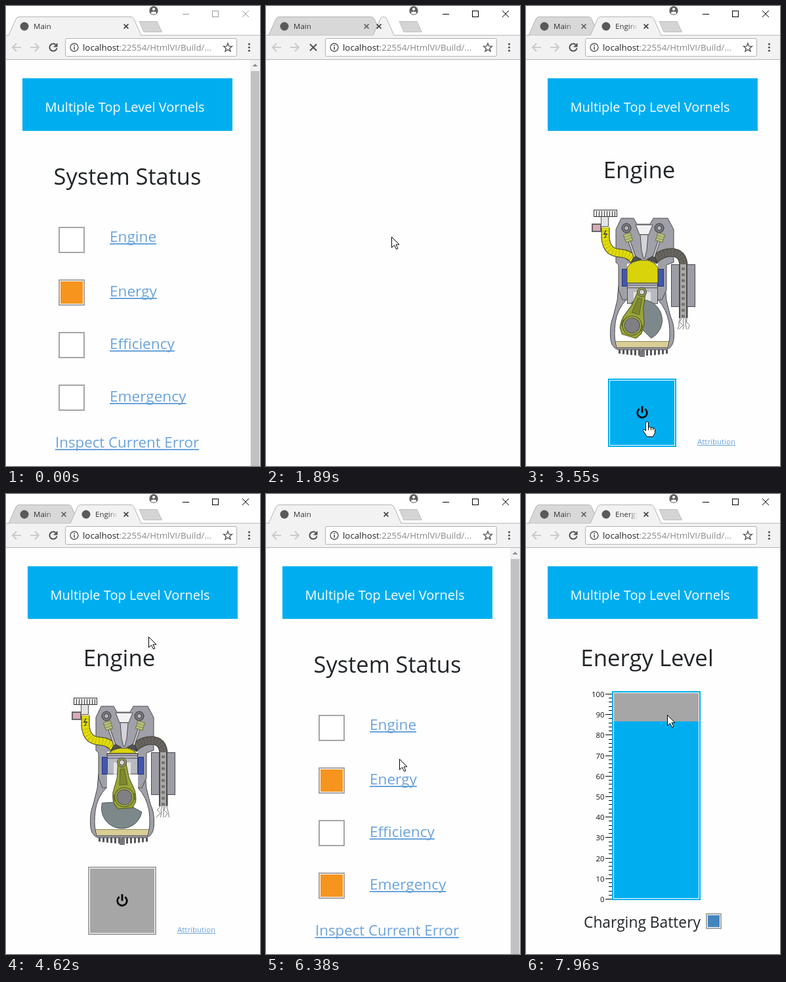
An HTML page with a canvas that plays this animation: 387 px wide and 700 px high, repeating every 8 s.

```html
<!DOCTYPE html>
<html lang="en">
<head>
<meta charset="utf-8">
<title>Main</title>
<style>
html, body { margin: 0; width: 100%; height: 100%; overflow: hidden; background: #fff; }
canvas { display: block; width: 387px; height: 700px; }
</style>
</head>
<body>
<canvas id="stage" width="387" height="700"></canvas>
<script>
const c = document.getElementById('stage').getContext('2d');
const LOOP = 8000, BLUE = '#00aef0', GREY = '#a6a6a6', INK = '#222629', LINK = '#6aa3da';
const FONT = '"Open Sans", "Noto Sans", sans-serif';

// Times of the main events, in ms
const FOCUS = 1740, OPEN_A = 1890, CLOSE_A = 5640, OPEN_B = 6760, LOAD = 190;
const POWER_OFF = 3610, DRAG = 7150;

const clamp = (v, a = 0, b = 1) => Math.min(b, Math.max(a, v));
const easeOut = p => 1 - (1 - clamp(p)) ** 2;

// Pointer path: time, x, y
const PATH = [
  [310, 275, 641], [620, 246, 545], [1050, 191, 351], [1890, 191, 351],
  [2300, 188, 355], [2530, 180, 369], [2690, 222, 352], [2810, 236, 300], [2940, 178, 253],
  [3070, 116, 325], [3200, 130, 450], [3450, 184, 632], [4010, 184, 632],
  [4340, 217, 217], [4620, 217, 217], [4760, 220, 195], [5250, 176, 25],
  [5400, 180, 29], [5600, 180, 29], [6380, 203, 403], [6530, 197, 430],
  [6990, 197, 430], [7150, 205, 610], [7550, 206, 449], [7960, 215, 336], [8000, 215, 336]
];

function slope(i, k) {
  const a = PATH[i - 1], b = PATH[i], d = PATH[i + 1];
  if (!a || !d) return 0;
  const same = (p, q) => p[1] === q[1] && p[2] === q[2];
  return same(a, b) || same(b, d) ? 0 : (d[k] - a[k]) / (d[0] - a[0]);
}

function pointer(t) {
  if (t < PATH[0][0]) return null;
  let i = 0;
  while (i < PATH.length - 2 && t >= PATH[i + 1][0]) i++;
  const a = PATH[i], b = PATH[i + 1], h = b[0] - a[0], u = clamp((t - a[0]) / h);
  const at = k => (2 * u ** 3 - 3 * u * u + 1) * a[k] + (u ** 3 - 2 * u * u + u) * h * slope(i, k)
    + (3 * u * u - 2 * u ** 3) * b[k] + (u ** 3 - u * u) * h * slope(i + 1, k);
  return { x: at(1), y: at(2) };
}

const inside = (p, x, y, w, h) => p && p.x >= x && p.x <= x + w && p.y >= y && p.y <= y + h;

// Drawing helpers
function rect(x, y, w, h, fill) { c.fillStyle = fill; c.fillRect(x, y, w, h); }

function trace(pts, closed) {
  c.beginPath();
  for (let i = 0; i < pts.length; i += 2) c.lineTo(pts[i], pts[i + 1]);
  if (closed) c.closePath();
}

function poly(pts, fill, line, w = 1) {
  trace(pts, true);
  if (fill) { c.fillStyle = fill; c.fill(); }
  if (line) { c.strokeStyle = line; c.lineWidth = w; c.stroke(); }
}

function stroke(pts, color, w = 1) {
  trace(pts);
  c.strokeStyle = color; c.lineWidth = w; c.stroke();
}

function disc(x, y, r, fill, line, w = 1) {
  c.beginPath(); c.arc(x, y, r, 0, 7);
  if (fill) { c.fillStyle = fill; c.fill(); }
  if (line) { c.strokeStyle = line; c.lineWidth = w; c.stroke(); }
}

function cross(x, y, r, color, w) {
  stroke([x - r, y - r, x + r, y + r], color, w);
  stroke([x + r, y - r, x - r, y + r], color, w);
}

function text(s, x, y, size, color, align = 'left') {
  c.font = size + 'px ' + FONT;
  c.textAlign = align;
  c.fillStyle = color;
  c.fillText(s, x, y);
  return c.measureText(s).width;
}

function link(s, x, y, size, w) {
  const len = text(s, x, y, size, LINK);
  rect(x, y + (w > 1 ? 2 : 1), len, w, LINK);
}

function framed(x, y, w, h, fill, border = GREY) {
  rect(x, y, w, h, border);
  rect(x + 2, y + 2, w - 4, h - 4, '#fff');
  if (fill) rect(x + 3, y + 3, w - 6, h - 6, fill);
}

function banner(x) {
  rect(x, 110, 320, 80, BLUE);
  text('Multiple Top Level Vornels', x + 156, 161, 20, '#fff', 'center');
}

// Browser frame
function tab(l, r, active, title, hot) {
  c.beginPath();
  c.moveTo(l, 44.5);
  c.lineTo(l + 11, 20);
  c.quadraticCurveTo(l + 12.5, 16.5, l + 16, 16.5);
  c.lineTo(r - 16, 16.5);
  c.quadraticCurveTo(r - 12.5, 16.5, r - 11, 20);
  c.lineTo(r, 44.5);
  c.fillStyle = active ? '#f2f2f2' : '#d8d8d8';
  c.fill();
  c.strokeStyle = '#b4b4b4'; c.lineWidth = 1; c.stroke();
  if (active) rect(l + 1, 44, r - l - 2, 2, '#f2f2f2');
  const x = r - 23;
  if (title) {
    disc(l + 24, 31, 6.5, '#5c5a58');
    const end = x - 13, fade = c.createLinearGradient(end - 14, 0, end, 0);
    fade.addColorStop(0, '#333');
    fade.addColorStop(1, 'rgba(51,51,51,0)');
    text(title, l + 38, 35, 11.5, fade);
  }
  if (hot) disc(x, 31, 7, '#b8392f');
  cross(x, 31, 3.4, hot ? '#fff' : active ? '#444' : '#666', 1.7);
}

function arrow(x, dir, color) {
  stroke([x - 7 * dir, 63, x + 6 * dir, 63], color, 1.8);
  stroke([x, 57, x + 6 * dir, 63, x, 69], color, 1.8);
}

function browser(t, s, p) {
  rect(0, 0, 387, 45, '#fff');
  const ink = t < FOCUS ? '#999' : '#000';
  rect(269, 12, 10, 1, ink);
  c.strokeStyle = ink; c.lineWidth = 1; c.strokeRect(314.5, 7.5, 9, 9);
  cross(365, 12, 5, ink, 1);
  disc(225, 7, 6.7, '#5f6063');
  disc(225, 4.8, 2.1, '#fff');
  c.beginPath(); c.ellipse(225, 10.6, 4, 2, 0, 0, 7); c.fillStyle = '#fff'; c.fill();

  rect(0, 44, 387, 1, '#b8b8b8');
  rect(0, 45, 387, 36, '#f2f2f2');
  rect(0, 81, 387, 1, '#b8b6b8');
  c.lineJoin = 'round';
  poly([203, 23.5, 230, 23.5, 237.5, 39.5, 210, 39.5], '#d4d4d4', '#bebebe');
  c.lineJoin = 'miter';

  const mainR = 206 - 95 * s.q, l = mainR - 13, r = 190 + 16 * s.q;
  const hot = p && Math.hypot(p.x - 183, p.y - 31) < 7;
  if (s.page === 'main') {
    if (s.q > 0.1) tab(l, r, false, '');
    tab(4, mainR, true, 'Main');
  } else {
    tab(4, mainR, false, 'Main');
    tab(l, r, true, s.loaded ? s.page : '', hot);
  }

  arrow(16, -1, '#c8c8c8');
  arrow(44, 1, '#c8c8c8');
  if (s.loaded) {
    c.beginPath(); c.arc(72, 63, 5.6, 0.2, 5.4);
    c.strokeStyle = '#505050'; c.lineWidth = 2; c.stroke();
    poly([78.5, 56, 78.5, 62.5, 72, 62.5], '#505050');
  } else cross(72, 63, 5, '#505050', 2);

  c.beginPath(); c.roundRect(90.5, 49.5, 261, 27, 2);
  c.fillStyle = '#fff'; c.fill();
  c.strokeStyle = '#b2b2b2'; c.lineWidth = 1; c.stroke();
  disc(104, 63, 6, null, '#555', 1.4);
  rect(103.2, 62, 1.7, 4.5, '#555');
  rect(103.2, 59.3, 1.7, 1.7, '#555');
  const w = text('localhost', 117, 68, 13.3, '#222');
  text(':22554/HtmlVI/Build/...', 117 + w, 68, 13.3, '#85878a');
  const star = [];
  for (let i = 0; i < 10; i++) {
    const a = i * Math.PI / 5 - Math.PI / 2, k = i % 2 ? 2.9 : 6.8;
    star.push(338 + k * Math.cos(a), 63.5 + k * Math.sin(a));
  }
  poly(star, null, '#555', 1.4);
  for (const y of [58, 63, 68]) disc(370.5, y, 1.6, '#505050');
}

// Pages
const LINKS = [['Engine', 359], ['Energy', 442], ['Efficiency', 522], ['Emergency', 602]];

function mainPage(t) {
  banner(25);
  text('System Status', 185, 272, 34.4, INK, 'center');
  LINKS.forEach(([name, y], i) => {
    const lit = i === 1 || (i === 3 && t > 700);
    framed(80, 336 + 80 * i, 40, 40, lit && '#f7941e');
    link(name, 158, y, 22.6, 2);
  });
  link('Inspect Current Error', 75, 672, 22.3, 2);
  rect(372, 82, 15, 618, '#f1f1f1');
  poly([375.5, 92, 379.5, 88, 383.5, 92], '#8a8a8a');
  rect(373, 99, 13, 601, '#c1c1c1');
}

// Crank angle in degrees, clockwise, 720 per four-stroke cycle
function crankAngle(t) {
  return t < 3550 ? 150 - (3550 - t) * 910 / 1020 : 150 + Math.min(133, (t - 3550) * 133 / 130);
}

function pipe(path, color, w) {
  const shape = new Path2D(path);
  for (const [s, lw] of [['#3c3c34', w + 2], [color, w]]) {
    c.strokeStyle = s; c.lineWidth = lw; c.stroke(shape);
  }
  c.setLineDash([1, 4]);
  c.strokeStyle = 'rgba(0,0,0,.18)'; c.lineWidth = w; c.stroke(shape);
  c.setLineDash([]);
}

function valve(x, dx, lift) {
  c.save();
  c.translate(x, 351);
  c.rotate(-Math.atan2(dx, 38));
  rect(-2, -2, 4, 38 + lift, '#4c4c4c');
  rect(-1, -2, 2, 38 + lift, '#d0d0d4');
  poly([-8, 39 + lift, 8, 39 + lift, 2, 33 + lift, -2, 33 + lift], '#555', '#333');
  rect(-6, -5, 12, 13, '#6f7440');
  rect(-5, -4, 10, 11, '#bcc27c');
  rect(-5, -1, 10, 1, '#7d8250');
  rect(-5, 3, 10, 1, '#7d8250');
  c.restore();
}

function engine(t) {
  const deg = crankAngle(t), a = deg * Math.PI / 180;
  const phase = (((deg + 90) % 720) + 720) % 720;
  const cx = 176.5, cy = 478, bx = cx + 17 * Math.cos(a), by = cy + 17 * Math.sin(a);
  const pin = by - Math.sqrt(53 * 53 - (bx - cx) ** 2), top = pin - 14;
  const gas = phase < 380 ? '#d9d30c' : phase < 540 ? '#e8912a' : '#8a867c';
  const lift = s => phase > s && phase < s + 180 ? 5 * Math.sin((phase - s) * Math.PI / 180) : 0;
  const steel = '#a0a0a8', edge = '#4a4a50';

  // Air filter and sensor
  rect(114, 321, 12, 14, '#e4e4e4');
  c.strokeStyle = '#555'; c.lineWidth = 1; c.strokeRect(114.5, 320.5, 11, 15);
  rect(103, 310, 36, 11, '#333');
  rect(104, 311, 34, 9, '#f4f4f4');
  for (let x = 107; x < 137; x += 4) rect(x, 312, 1, 8, '#333');
  rect(100, 331, 15, 13, '#666');
  rect(102, 333, 11, 9, '#d9aab8');

  // Crankcase: thick outer wall around a white chamber
  const shell = new Path2D('M141 426L139 448L133 472Q128 484 128.5 500Q128 519 140 523L214 523Q226 519 225.5 500Q226 484 220 472L214 448L212 426Z');
  const chamber = new Path2D('M154 426L153 447Q139 461 136 482Q134 500 136 511L138 520L216 520L218 511Q220 500 218 482Q214 461 201 447L201 426Z');
  c.fillStyle = steel; c.fill(shell);
  c.strokeStyle = edge; c.lineWidth = 1; c.stroke(shell);
  c.fillStyle = '#fff'; c.fill(chamber);
  c.save(); c.clip(chamber);
  rect(130, 511, 96, 12, '#d9ce96');
  rect(130, 510, 96, 1, '#8f8656');
  c.restore();
  c.stroke(chamber);
  for (let x = 141; x < 214; x += 6) rect(x, 523, 3, 6 + 3 * Math.sin((x - 141) / 73 * Math.PI), '#55555a');
  rect(173, 524, 8, 10, '#77777c');

  // Head and cylinder
  poly([137, 340, 145, 323, 164, 323, 169, 332, 189, 332, 194, 323, 216, 323, 225, 340, 225, 390,
    214, 394, 214, 432, 207, 447, 147, 447, 141, 432, 141, 394, 137, 390], steel, edge);
  rect(146, 400, 9, 27, '#29356f'); rect(147, 401, 7, 25, '#4358ad');
  rect(201, 400, 9, 27, '#29356f'); rect(202, 401, 7, 25, '#4358ad');
  rect(154, 392, 47, 56, '#fff');
  poly([154, 398, 160, 391, 169, 387, 186, 387, 195, 391, 201, 398, 201, top, 154, top], gas, '#55551c');
  pipe('M194 388Q206 375 222 375Q240 376 240 396L240 474', '#68645f', 11);

  // Muffler
  rect(221, 393, 37, 65, edge);
  rect(222, 394, 35, 63, '#9c9ca5');
  rect(233, 393, 13, 82, '#4a4a4a');
  rect(235, 393, 9, 82, '#a9a9a9');
  for (let y = 398; y < 474; y += 9) rect(237, y, 5, 4, '#77736c');
  const drift = Math.min(t, 3680) / 60;
  for (let i = 0; i < 5; i++) {
    const x = 235 + i * 2.5, s = Math.sin(drift + i * 2) * 1.5;
    stroke([x, 475, x + i - 3 + s, 481, x + i - 1 - s, 486, x + 2 * i - 5 + s, 492], '#777', 1);
  }

  pipe('M121 337L121 353Q123 375 142 376Q160 377 166 390', '#e2dc0c', 11);
  stroke([122, 341, 119, 347, 123, 347, 120, 353], '#333', 1.3);
  for (const x of [153, 203]) {
    disc(x, 338, 7, '#7b7b82', '#333');
    disc(x, 338, 3.5, '#b8b8bd', '#333');
  }
  poly([167, 333, 193, 333, 187, 348, 173, 348], '#f2f2f2', edge);
  poly([174, 348, 186, 348, 184, 372, 181, 384, 179, 384, 176, 372], '#d3d3d8', edge);
  valve(155, 13, lift(0));
  valve(205, -13, lift(540));

  // Piston
  rect(154, top, 47, 32, edge);
  rect(155, top + 1, 45, 30, '#b9b9c0');
  for (const d of [3, 7]) rect(154, top + d, 47, 1, '#4a4a50');
  rect(164, top + 14, 26, 18, '#e6e6ea');

  // Counterweight, rod and bearing
  c.beginPath();
  c.arc(cx, cy, 31, a + Math.PI - 1.6, a + Math.PI + 1.6);
  c.lineTo(cx + 10 * Math.cos(a), cy + 10 * Math.sin(a));
  c.closePath();
  c.fillStyle = '#7d888b'; c.fill();
  c.strokeStyle = '#4b5456'; c.lineWidth = 1; c.stroke();
  c.save();
  c.translate(bx, by);
  c.rotate(Math.atan2(bx - cx, by - pin) * -1);
  poly([-6, -53, 6, -53, 9, -30, 17, -8, 17, 8, 11, 17, -11, 17, -17, 8, -17, -8, -9, -30], '#99a43a', '#4f551c');
  poly([-3, -43, 3, -43, 6, -19, -6, -19], '#7d8830', '#5d6424');
  for (const x of [-18, 14]) rect(x, -5, 4, 10, '#6e762c');
  disc(0, 0, 14.5, '#a4ad48', '#4f551c');
  disc(0, 0, 11.5, '#808084', '#4c4c4c');
  c.restore();
  disc(cx, pin, 7, '#99a04c', '#444');
  disc(cx, pin, 4, '#d8d8dc', '#333');
}

function enginePage(t, p) {
  banner(33);
  text('Engine', 172.5, 262, 34.9, INK, 'center');
  engine(t);
  const hot = inside(p, 125, 567, 104, 104);
  framed(125, 567, 104, 104, t < POWER_OFF ? BLUE : GREY, hot ? BLUE : GREY);
  c.beginPath(); c.arc(177, 619, 7.3, -0.95, Math.PI + 0.95);
  c.strokeStyle = '#000'; c.lineWidth = 2.7; c.stroke();
  rect(175.6, 609, 2.8, 10, '#000');
  link('Attribution', 261, 667, 11.5, 1);
}

function energyPage(t, p) {
  const drag = t >= DRAG, level = drag ? Math.min(615, p.y + 10) : 615;
  banner(33);
  text('Energy Level', 184.5, 262, 34.8, INK, 'center');
  for (let v = 0; v <= 100; v += 2) {
    const y = Math.round(616 - v * 3.12), major = v % 10 === 0;
    rect(major ? 121 : 126, y, major ? 10 : 5, 1, '#000');
    if (major) text(v, 119.5, y + 4.5, 11.3, '#111', 'right');
  }
  framed(131, 300, 135, 318, GREY, drag ? BLUE : GREY);
  rect(134, level, 129, 615 - level, BLUE);
  text('Charging Battery', 88, 660, 22.8, INK);
  framed(274, 638, 24, 24, level < 612 && '#4285bf');
}

// Pointers
function drawPointer(p, hand) {
  c.save();
  c.translate(Math.round(p.x) + 0.5, Math.round(p.y) + 0.5);
  c.lineJoin = 'round';
  if (hand) {
    const shape = new Path2D('M-2 1Q0-1 2 1L2 9Q4 7 6 9Q8 8 9 10Q12 9 12 12L12 17L9 23L0 23L-6 14Q-6 11-4 12L-2 14Z');
    c.fillStyle = '#fff'; c.fill(shape);
    c.strokeStyle = '#000'; c.lineWidth = 1; c.stroke(shape);
    for (const x of [2, 6, 9]) stroke([x, 9, x, 13], '#000');
  } else {
    poly([0, 0, 0, 16, 4, 12.5, 7, 18.5, 9.5, 17.5, 6.5, 11.5, 11.5, 11.5], '#fff', '#000');
  }
  c.restore();
}

function state(t) {
  const opening = s => 0.305 + 0.695 * easeOut((t - s) / 150);
  if (t < OPEN_A) return { page: 'main', q: 0, loaded: true };
  if (t < CLOSE_A) return { page: 'Engine', q: opening(OPEN_A), loaded: t >= OPEN_A + LOAD };
  if (t < OPEN_B) return { page: 'main', q: 1 - easeOut((t - CLOSE_A) / 160), loaded: true };
  return { page: 'Energy', q: opening(OPEN_B), loaded: t >= OPEN_B + LOAD };
}

function draw(t) {
  const s = state(t), p = pointer(t);
  rect(0, 0, 387, 700, '#fefefe');
  let hand = false;
  if (s.page === 'main') {
    mainPage(t);
    hand = LINKS.some(([, y]) => inside(p, 158, y - 19, 72, 24)) || inside(p, 75, 653, 219, 24);
  } else if (s.loaded && s.page === 'Engine') {
    enginePage(t, p);
    hand = inside(p, 125, 567, 104, 104);
  } else if (s.loaded) energyPage(t, p);
  browser(t, s, p);
  if (p) drawPointer(p, hand);
}

const start = performance.now();
function tick() {
  draw((performance.now() - start) % LOOP);
  requestAnimationFrame(tick);
}
tick();
</script>
</body>
</html>
```
